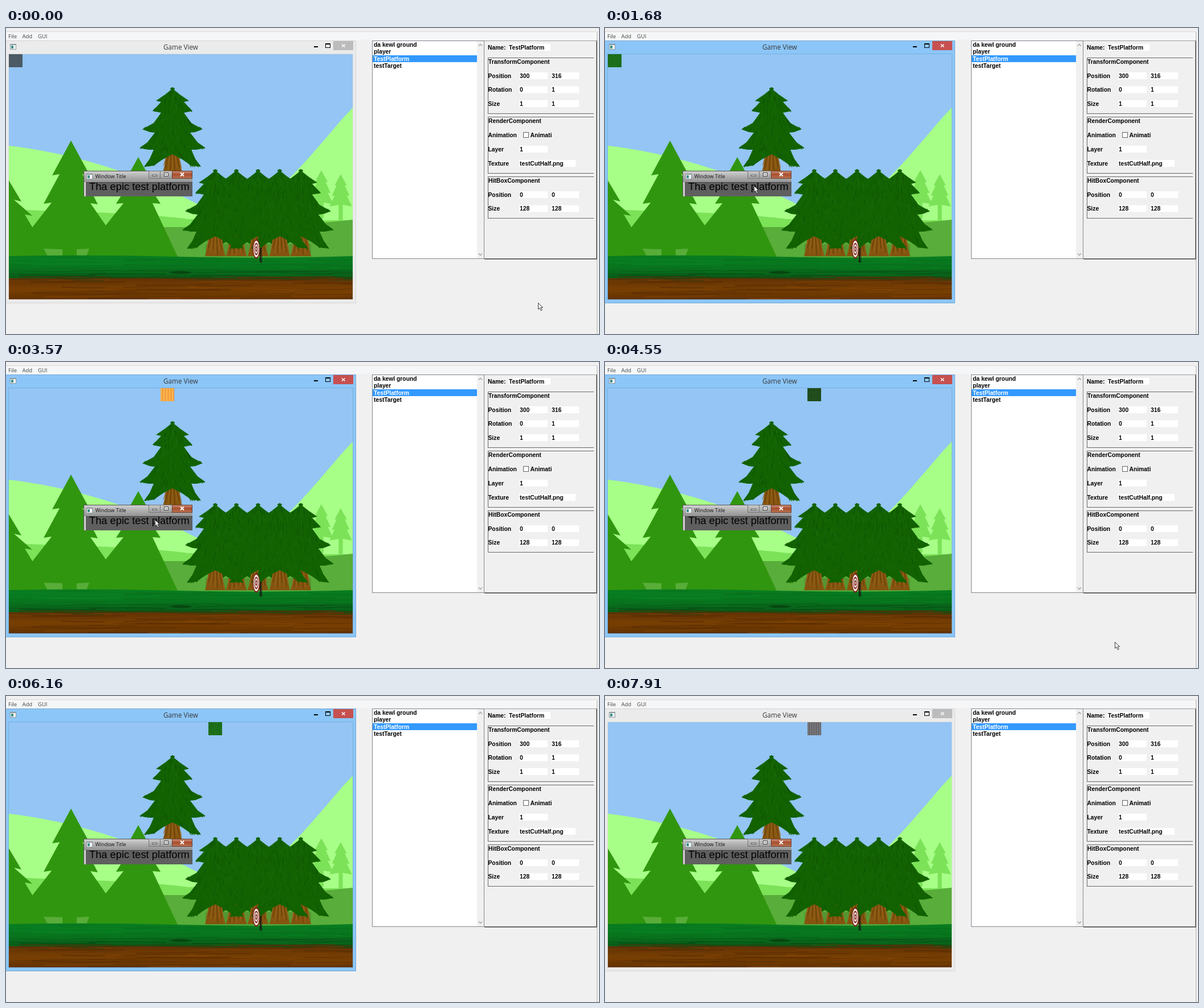
Recreate the animation shown at these times as an HTML page with a canvas. Size 1040 by 538 pixels, loop 7.98 s.

```html
<!DOCTYPE html>
<html lang="en">
<head>
<meta charset="utf-8">
<title>Game View</title>
<style>
html, body { margin: 0; width: 100%; height: 100%; overflow: hidden; background: #f0f0f0; }
canvas { display: block; }
</style>
</head>
<body>
<canvas id="stage" width="1040" height="538"></canvas>
<script>
const W = 1040, H = 538, LOOP = 7980, STEP = 70;
const UI = '"Open Sans", sans-serif', BOLD = 'bold 10.3px "Liberation Sans", sans-serif';
const stage = document.getElementById('stage').getContext('2d');
let g, seed;

const random = () => (seed = (seed * 16807) % 2147483647) / 2147483647;
const between = (a, b) => a + random() * (b - a);

function rect(x, y, w, h, color) {
  g.fillStyle = color;
  g.fillRect(x, y, w, h);
}
function frame(x, y, w, h, color) {
  g.strokeStyle = color;
  g.lineWidth = 1;
  g.strokeRect(x + .5, y + .5, w - 1, h - 1);
}
function text(str, x, y, font = BOLD, color = '#000', align = 'left') {
  g.font = font;
  g.fillStyle = color;
  g.textAlign = align;
  g.fillText(str, x, y);
}
function shape(d, fill, stroke, width = 1) {
  const path = new Path2D(d);
  if (fill) { g.fillStyle = fill; g.fill(path); }
  if (stroke) { g.strokeStyle = stroke; g.lineWidth = width; g.stroke(path); }
}
// Mirrored outline from the points of its right half
function mirrored(cx, top, k, half) {
  const right = half.map(([x, y]) => [cx + x * k, top + y * k]);
  const left = half.map(([x, y]) => [cx - x * k, top + y * k]).reverse();
  return 'M' + right.concat(left).join('L') + 'Z';
}
function gradient(y0, y1, ...colors) {
  const fill = g.createLinearGradient(0, y0, 0, y1);
  colors.forEach((c, i) => fill.addColorStop(i / (colors.length - 1), c));
  return fill;
}

const PINE = [[0, 0], [4, 2], [3, 5], [13, 13], [29, 24], [20, 26], [35, 42], [20, 45], [33, 63], [53, 74],
  [40, 79], [31, 80], [44, 97], [58, 107], [42, 110], [33, 110], [40, 126], [50, 140], [33, 138], [17, 127], [0, 118]];

function pine(cx, top) {
  shape(mirrored(cx, top, 1, [[0, 116], [12, 118], [14, 138], [18, 153], [0, 153]]), '#85540f');
  for (let i = -4; i < 5; i++)
    shape(`M${cx + i * 2.5} ${top + 120}L${cx + i * 4} ${top + between(138, 153)}`, '', i % 2 ? '#5f3a09' : '#9b6718');
  const outline = mirrored(cx, top, 1, PINE);
  shape(outline, '#126202');
  g.save();
  g.clip(new Path2D(outline));
  for (let i = 0; i < 150; i++) {
    const y = top + between(6, 140), x = cx + between(-1, 1) * (8 + (y - top) * .38);
    const lean = (x - cx) * .16;
    shape(`M${x} ${y}q${lean * .4} 3 ${lean} ${between(5, 11)}`, '', random() < .55 ? '#0f5104' : '#176b07');
  }
  g.restore();
  // Ragged needles along the lower edge of each tier
  for (const [wide, dy] of [[34, 42], [51, 75], [56, 108], [48, 139]])
    for (const side of [-1, 1])
      for (let i = 0; i < 6; i++) {
        const x = wide - i * 3;
        shape(`M${cx + side * (x - 4)} ${top + dy - 5}l${side * 4} ${between(3, 7)}`, '', '#126002', 1.3);
      }
}

function smallTree(cx, top, k) {
  shape(mirrored(cx, top, k, [[0, 0], [12, 22], [8, 22], [17, 42], [12, 42], [22, 63], [4, 60], [4, 90]]), '#7ce258');
}

function brush(count, y0, y1, colors, alpha) {
  g.globalAlpha = alpha;
  for (let i = 0; i < count; i++) {
    const x = between(-40, 600), y = between(y0, y1), w = between(40, 190);
    shape(`M${x} ${y}q${w / 2} ${between(-3, 3)} ${w} ${between(-2, 2)}`, '',
      colors[Math.floor(random() * colors.length)], between(.6, 2.2));
  }
  g.globalAlpha = 1;
}

function scene() {
  g.save();
  g.beginPath();
  g.rect(5, 46, 603, 431);
  g.clip();
  rect(5, 46, 603, 431, '#94c5f4');
  shape('M5 207C90 217 205 243 335 309V410H5Z', '#a7ff88');
  shape('M420 330C510 265 560 190 608 140V410H420Z', '#a7ff88');
  shape('M5 318C90 324 210 322 320 336L520 338H608V410H5Z', '#7ce258');
  smallTree(553, 250, .95);
  smallTree(587, 257, .9);
  shape('M250 350C350 350 500 350 608 337V410H250Z', '#59ad3a');
  const fir = '#31960f';
  shape('M5 268L27 305L14 302L46 330L33 328L77 402H5Z', fir);
  shape('M232 227L258 274L248 273L271 309L257 308L301 402H131L206 308L193 309L216 273L206 274Z', fir);
  shape('M114 198L147 259L134 257L161 310L148 308L213 402H6L80 307L66 309L94 257L81 259Z', fir);
  shape('M66 388L99 389V401H73ZM124 389L146 388L141 401H124Z', '#58ad38');

  pine(292, 104);
  rect(350, 380, 185, 22, 'rgba(80,120,40,.45)');
  for (const x of [404, 442, 517, 367, 480]) pine(x, 248);

  shape('M5 401Q150 398 300 402T608 401V442H5Z', gradient(400, 442, '#087d20', '#08741e', '#075c18'));
  brush(45, 404, 429, ['#0b8426', '#096c1b', '#07781d'], .6);
  brush(50, 426, 440, ['#064d12', '#08671b', '#0b5519'], .75);
  shape('M286 430q18-6 42 0q-20 5-42 0Z', '#07480f');
  rect(5, 440, 603, 37, gradient(440, 477, '#623205', '#783f03', '#633200'));
  brush(70, 444, 477, ['#6b3602', '#804506', '#562c04'], .65);
  brush(28, 437, 444, ['#3c3a0b', '#134d12', '#573209'], .8);

  rect(445, 387, 2, 25, '#171313');
  rect(448, 386, 1, 27, '#111');
  for (const [rx, ry, color] of [[6.3, 17, '#7e2415'], [5, 14.5, '#f3eeee'], [3.8, 11, '#8b3527'],
    [2.8, 8, '#f3eeee'], [1.8, 5, '#8b3527'], [.7, 2, '#eee']]) {
    g.beginPath();
    g.ellipse(439, 388.5, rx, ry, 0, 0, 7);
    g.fillStyle = color;
    g.fill();
  }
  platformWindow();
  g.restore();
}

function appIcon(x, y) {
  rect(x, y, 11, 10, '#8b969c');
  rect(x + 1, y + 2, 9, 7, '#f8fafa');
  rect(x + 2, y + 3, 4, 5, '#3c8f88');
}

function platformWindow() {
  rect(136, 251, 191, 45, '#d1d1d1');
  rect(136, 251, 191, 20, gradient(251, 271, '#d2d2d2', '#b0b0b0', '#939393'));
  rect(136, 251, 191, 1, '#555');
  rect(136, 251, 1, 45, '#555');
  appIcon(141, 256);
  text('Window Title', 156.5, 264, `9px ${UI}`, '#111');
  rect(250, 251, 20, 13, gradient(251, 264, '#ccc', '#9d9d9d'));
  rect(270, 251, 21, 13, gradient(251, 264, '#ccc', '#9d9d9d'));
  rect(291, 251, 35, 13, gradient(251, 264, '#d2967f', '#a84e30', '#b9704d'));
  frame(250, 251, 21, 14, '#777');
  frame(270, 251, 22, 14, '#777');
  frame(291, 251, 36, 14, '#694032');
  rect(256, 258, 9, 3, '#fff');
  frame(256, 258, 9, 3, '#555');
  frame(277, 254, 8, 7, '#444');
  frame(278, 255, 6, 5, '#fff');
  shape('M306 254.5l6 6m0-6l-6 6', '', '#fff', 1.8);
  rect(140, 271, 187, 25, '#5f5f5f');
  rect(140, 271, 187, 1, '#444');
  text('Tha epic test platform', 146, 285, '18.3px "Liberation Sans", sans-serif');
}

function gameWindow(active) {
  rect(0, 22, 614, 462, active ? '#8cc6f8' : '#ebebeb');
  const edge = active ? '#72a9d8' : '#d6d6d6';
  rect(0, 22, 614, 1, edge);
  rect(613, 22, 1, 462, edge);
  rect(0, 483, 614, 1, edge);
  appIcon(7, 28);
  text('Game View', 306.5, 38, `11.7px ${UI}`, '#383838', 'center');
  rect(540, 32, 7, 2, '#000');
  frame(560, 27, 9, 8, '#000');
  rect(560, 27, 9, 2, '#000');
  rect(574, 23, 35, 16, active ? '#c75050' : '#bcbcbc');
  shape('M589 28.5l5.5 5m0-5l-5.5 5', '', '#fff', 1.5);
  frame(4, 45, 605, 433, active ? '#78b1df' : '#dfdfdf');
  scene();
}

function objectList() {
  rect(642, 22, 197, 384, '#828790');
  rect(643, 23, 195, 382, '#fff');
  rect(826, 23, 12, 382, '#f0f0f0');
  shape('M829 31.5l3-3l3 3M829 396.5l3 3l3-3', '', '#a0a0a0', 1.3);
  rect(643, 48, 183, 12, '#3399ff');
  ['da kewl ground', 'player', 'TestPlatform', 'testTarget'].forEach((name, i) =>
    text(name, 645, 33 + i * 12.3, BOLD, i === 2 ? '#fff' : '#000'));
}

function field(x, y, w, value) {
  rect(x, y - 6, w, 12, '#fff');
  text(value, x + 1, y + 3.5);
}
function group(title, top, bottom) {
  rect(845, top, 186, 1, '#696969');
  rect(845, bottom, 186, 1, '#696969');
  rect(845, top, 1, bottom - top, '#696969');
  text(title, 846, top + 11);
}
function row(label, y, a, b) {
  text(label, 845.5, y + 3.5);
  if (a !== undefined) field(900, y, 50, a);
  if (b !== undefined) field(956, y, 49, b);
}

function inspector() {
  rect(839, 22, 198, 385, '#696969');
  rect(839, 23, 196, 382, '#f0f0f0');
  rect(839, 22, 197, 1, '#a0a0a0');
  text('Name:', 845, 37.5);
  field(881, 34, 74, 'TestPlatform');
  group('TransformComponent', 52, 150);
  row('Position', 84, '300', '316');
  row('Rotation', 108.5, '0', '1');
  row('Size', 133, '1', '1');
  group('RenderComponent', 156, 255);
  row('Animation', 188.5);
  rect(907, 183, 10, 10, '#fff');
  frame(907, 183, 10, 10, '#666');
  text('Animati', 919.5, 192);
  row('Layer', 213, '1');
  row('Texture', 238);
  field(900, 238, 99, 'testCutHalf.png');
  group('HitBoxComponent', 261, 334);
  row('Position', 293, '0', '0');
  row('Size', 317.5, '128', '128');
}

function desktop(active) {
  const canvas = document.createElement('canvas');
  canvas.width = W;
  canvas.height = H;
  g = canvas.getContext('2d');
  seed = 71;
  rect(0, 0, W, H, '#f0f0f0');
  rect(0, 6, 1037, 1, '#d9d9d9');
  rect(0, 7, 1036, 14, '#f5f6f7');
  rect(1036, 7, 1, 531, '#b4b4b4');
  [['File', 4], ['Add', 28.5], ['GUI', 56]].forEach(([s, x]) => text(s, x, 18, `9.5px ${UI}`, '#444'));
  gameWindow(active);
  objectList();
  inspector();
  return canvas;
}

// Tile looks: base colour, grain colour, grain spacing (0 = speckled)
const LIGHT = ['#f9c86c', '#efb458', 4], BARK = ['#77767a', '#5a585c', 4];
const TILES = [['#4c5b66', '#485762', 0], ['#214d1c', '#1b4218', 0], ['#1d701a', '#186016', 0], LIGHT,
  ['#4a3d3d', '#453838', 0], BARK, LIGHT, ['#fdb04c', '#e08a2a', 5], BARK];

function tile(x, [base, grain, gap]) {
  rect(x, 46, 24, 23, base);
  seed = 19;
  if (gap) {
    for (let i = 3; i < 24; i += gap) rect(x + i, 46, 1, 23, grain);
  } else {
    for (let i = 0; i < 35; i++) rect(x + Math.floor(between(0, 23)), 46 + Math.floor(between(0, 21)), 1, 2, grain);
  }
}

// Tiles advance six times in seven steps, with two extra holds
function tileIndex(n) {
  const held = Math.floor((n + (n < 70 ? 2 : 1)) / 7) + (n >= 10) + (n >= 80);
  return (n - held) % TILES.length;
}

function along(keys, t) {
  let i = 0;
  while (i < keys.length - 1 && keys[i + 1][0] <= t) i++;
  const a = keys[i], b = keys[i + 1] || a;
  const p = a === b ? 0 : Math.max(0, (t - a[0]) / (b[0] - a[0]));
  return a.slice(1).map((v, k) => Math.round(v + (b[k + 1] - v) * p));
}
const POINTER = [[70, 933, 483], [280, 819, 426], [350, 819, 426], [630, 595, 372], [700, 595, 372],
  [1050, 261, 277], [4200, 261, 277], [4550, 894, 492]];
const SLIDE = [[1960, 5], [2170, 54], [2660, 54], [3920, 355]];

function pointer(x, y) {
  shape(`M${x + .5} ${y + .5}v11l2.5-2.3l2.2 4.6l2-1l-2.2-4.4h3.4Z`, '#fff', '#222', .9);
}

const idle = desktop(false), focused = desktop(true);

function draw(now) {
  const n = Math.floor((now % LOOP) / STEP), t = n * STEP;
  g = stage;
  g.drawImage(t >= 1190 && t < 7840 ? focused : idle, 0, 0);
  tile(along(SLIDE, t)[0], TILES[tileIndex(n)]);
  if (t < 4620) pointer(...along(POINTER, t));
}
let start;
function tick(now) {
  start ??= now;
  draw(now - start);
  requestAnimationFrame(tick);
}
draw(0);
requestAnimationFrame(tick);
</script>
</body>
</html>
```
